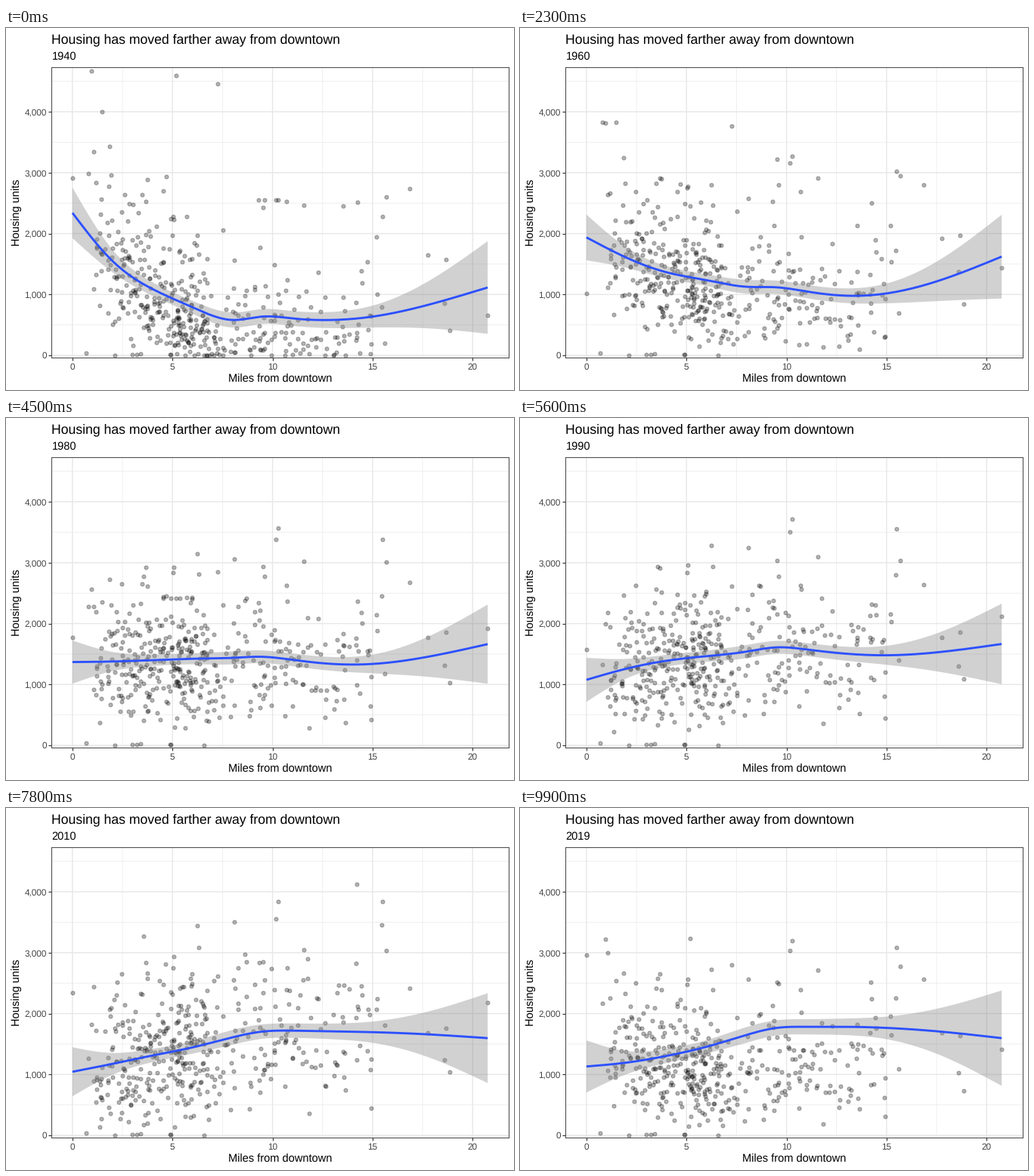
Write a matplotlib script that moves like this. It is 672 px wide and 480 px high and loops after 10000 ms.

```python
import numpy as np
import matplotlib.pyplot as plt
from matplotlib.animation import FuncAnimation
from matplotlib.patches import Polygon

W, H, DPI = 672, 480, 96
LEFT, RIGHT, TOP, BOTTOM = 60.45, 664.7, 52.2, 437.2
XLIM, YLIM = (-1.0375, 21.79), (-38, 4729)
PX = 72 / DPI  # points per pixel

plt.rcParams.update({"font.family": "Liberation Sans", "text.hinting": "none"})

YEARS = [1940, 1950, 1960, 1970, 1980, 1990, 2000, 2010, 2019]
STARTS = [0, 11, 23, 34, 45, 56, 67, 78, 89]
FRAMES = 100

# Years with known values; the decades between are interpolated.
KEYS = [1940, 1950, 1960, 1970, 1990, 2010, 2019]
SPREAD = [1, 0.95, 0.905, 0.84, 0.87, 0.97, 1.03]

KNOTS = np.array([0, 2, 4, 6, 8, 9.5, 11, 13, 15, 18, 20.75])
BAND = np.array([415, 185, 112, 106, 125, 122, 122, 133, 180, 410, 760])
TREND = np.array([
    [2340, 1550, 1090, 790, 582, 638, 607, 582, 637, 850, 1115],
    [2228, 1630, 1225, 995, 778, 805, 765, 718, 770, 1050, 1392],
    [1937, 1605, 1365, 1235, 1127, 1118, 1050, 980, 1018, 1270, 1622],
    [1660, 1495, 1410, 1380, 1335, 1300, 1235, 1170, 1195, 1395, 1660],
    [1077, 1260, 1390, 1465, 1540, 1610, 1575, 1505, 1480, 1545, 1665],
    [1045, 1175, 1312, 1445, 1610, 1705, 1720, 1708, 1695, 1655, 1597],
    [1132, 1195, 1305, 1455, 1650, 1765, 1783, 1783, 1765, 1695, 1597],
])

# Tracts that stand apart from the cloud: miles, then units per key year.
NOTABLE = np.array([
    [0.00, 2915, 2620, 1020, 1975, 1570, 2340, 3005],
    [0.80, 2980, 2980, 3830, 3235, 1330, 1270, 1360],
    [0.93, 4665, 4530, 3815, 3145, 1990, 1820, 1765],
    [1.05, 3340, 3075, 2645, 2385, 2180, 2440, 2660],
    [1.47, 4005, 3605, 3830, 3350, 1350, 1120, 1085],
    [1.92, 2965, 3060, 2820, 2515, 2100, 2090, 1700],
    [3.74, 2885, 3020, 2895, 2700, 2520, 2580, 1900],
    [5.17, 4600, 2615, 2455, 2525, 2300, 1850, 1860],
    [7.27, 4455, 4255, 3770, 3090, 2615, 2620, 1145],
    [9.52, 2430, 3080, 3225, 2830, 3030, 2850, 2590],
    [14.2, 300, 450, 850, 1100, 1700, 4120, 4720],
    [16.84, 2735, 2785, 2805, 2715, 2635, 2415, 2395],
    [17.77, 1645, 1755, 1925, 1775, 1770, 1690, 1725],
    [18.60, 860, 1245, 1380, 1335, 1305, 1240, 1200],
    [18.67, 1580, 1860, 1965, 1860, 1865, 1760, 1690],
    [18.87, 410, 675, 845, 965, 1090, 1040, 1060],
    [20.75, 660, 950, 1435, 1720, 2125, 2180, 2170],
])
EMPTY_X = np.array([0.7, 2.1, 3.0, 3.2, 3.4, 4.88, 4.92, 6.57])
EMPTY_Y = np.array([40, 5, 20, 20, 25, 10, 18, 5])

# Number of tracts in each mile from 1 to 16.
DENSITY = [28, 40, 52, 50, 60, 40, 22, 22, 32, 25, 21, 12, 16, 13, 9]


def at_year(year, table):
    """Interpolate a table whose rows belong to the key years."""
    table = np.asarray(table, float)
    if table.ndim == 1:
        return np.interp(year, KEYS, table)
    return np.array([np.interp(year, KEYS, col) for col in table.T])


def spline(x, xs, ys):
    """Natural cubic spline through (xs, ys), evaluated at x."""
    n, h = len(xs), np.diff(xs)
    a, b = np.eye(n), np.zeros(n)
    for i in range(1, n - 1):
        a[i, i - 1:i + 2] = h[i - 1], 2 * (h[i - 1] + h[i]), h[i]
        b[i] = 6 * ((ys[i + 1] - ys[i]) / h[i] - (ys[i] - ys[i - 1]) / h[i - 1])
    m = np.linalg.solve(a, b)
    k = np.clip(np.searchsorted(xs, x) - 1, 0, n - 2)
    p, q, d = xs[k + 1] - x, x - xs[k], h[k]
    return ((m[k] * p**3 + m[k + 1] * q**3) / (6 * d)
            + (ys[k] / d - m[k] * d / 6) * p
            + (ys[k + 1] / d - m[k + 1] * d / 6) * q)


rng = np.random.default_rng(1940)
count = sum(DENSITY)
cdf = np.concatenate([[0], np.cumsum(DENSITY)]) / count
cloud_x = np.interp(rng.random(count), cdf, np.arange(1, 17))
z_first, z_last = np.clip(rng.normal(size=(2, count)), -2.3, 2.3)
tract_x = np.concatenate([cloud_x, NOTABLE[:, 0], EMPTY_X])
grid_x = np.linspace(0, 20.75, 160)


def units(year):
    """Housing units of every tract: a skewed spread around the trend."""
    mean = spline(cloud_x, KNOTS, at_year(year, TREND))
    c = np.minimum(360 * at_year(year, SPREAD) / mean, 0.6)
    turn = 1.2 * (year - 1940) / 79
    z = z_first * np.cos(turn) + z_last * np.sin(turn)
    cloud = mean * (1 + c * z) ** 2 / (1 + c**2)
    return np.concatenate([cloud, at_year(year, NOTABLE[:, 1:].T), EMPTY_Y])


def smooth(year):
    mid = spline(grid_x, KNOTS, at_year(year, TREND))
    half = spline(grid_x, KNOTS, BAND) * at_year(year, SPREAD)
    return mid, mid - half, mid + half


UNITS = [units(y) for y in YEARS]
SMOOTH = [smooth(y) for y in YEARS]

fig = plt.figure(figsize=(W / DPI, H / DPI), dpi=DPI, facecolor="white")
ax = fig.add_axes([LEFT / W, 1 - BOTTOM / H, (RIGHT - LEFT) / W, (BOTTOM - TOP) / H])
ax.set(xlim=XLIM, ylim=YLIM)
ax.set_axisbelow(True)
ax.set_xticks(range(0, 21, 5))
ax.set_yticks(range(0, 4001, 1000))
ax.set_xticks(np.arange(2.5, 20, 5), minor=True)
ax.set_yticks(range(500, 4501, 1000), minor=True)
ax.grid(which="minor", color="#e9e9e9", linewidth=0.71 * PX, snap=False)
ax.grid(which="major", color="#e7e7e7", linewidth=1.42 * PX, snap=False)
ax.tick_params(which="major", length=2.75, width=0.9, color="#333333",
               labelbottom=False, labelleft=False)
ax.tick_params(which="minor", length=0)
for spine in ax.spines.values():
    spine.set(color="#4d4d4d", linewidth=0.8, zorder=6)


def label(x, y, text, size, color="black", **kw):
    return fig.text(x / W, 1 - y / H, text, fontsize=size, color=color,
                    va="baseline", **kw)


def to_px(value, lim, start, end):
    return start + (value - lim[0]) / (lim[1] - lim[0]) * (end - start)


label(60.4, 20, "Housing has moved farther away from downtown", 13.2)
subtitle = label(60.4, 42, "", 11)
label((LEFT + RIGHT) / 2, 470, "Miles from downtown", 11, ha="center")
label(17.8, (TOP + BOTTOM) / 2, "Housing units", 11, ha="center",
      rotation=90, rotation_mode="anchor")
for v in range(0, 21, 5):
    label(to_px(v, XLIM, LEFT, RIGHT), 453, str(v), 8.8, "#444444", ha="center")
for v in range(0, 4001, 1000):
    label(53.9, to_px(v, YLIM, BOTTOM, TOP) + 4.2, f"{v:,}", 8.8, "#444444", ha="right")

dots = ax.scatter(tract_x, UNITS[0], s=(5.2 * PX) ** 2, facecolor=(0, 0, 0, 0.3),
                  edgecolor=(0, 0, 0, 0.3), linewidth=0.94 * PX, zorder=3)
ribbon = ax.add_patch(Polygon([[0, 0], [1, 0], [1, 1]], facecolor="#8c8c8c",
                              alpha=0.4, linewidth=0, zorder=4))
line, = ax.plot([], [], color="#2c50ff", linewidth=2.85 * PX, zorder=5,
                solid_capstyle="butt")
ax.set(xlim=XLIM, ylim=YLIM)


def draw(i):
    s = int(np.searchsorted(STARTS, i, side="right")) - 1
    y = UNITS[s]
    # Dots pass halfway to the next year before the fit and year switch.
    if i + 1 in STARTS[1:] + [FRAMES]:
        y = (y + UNITS[(s + 1) % len(YEARS)]) / 2
    dots.set_offsets(np.column_stack([tract_x, y]))
    mid, low, high = SMOOTH[s]
    line.set_data(grid_x, mid)
    ribbon.set_xy(np.column_stack([np.concatenate([grid_x, grid_x[::-1]]),
                                   np.concatenate([low, high[::-1]])]))
    subtitle.set_text(str(YEARS[s]))
    return dots, ribbon, line, subtitle


anim = FuncAnimation(fig, draw, frames=FRAMES, interval=100, repeat=True,
                     repeat_delay=0, blit=False)
plt.show()
```
